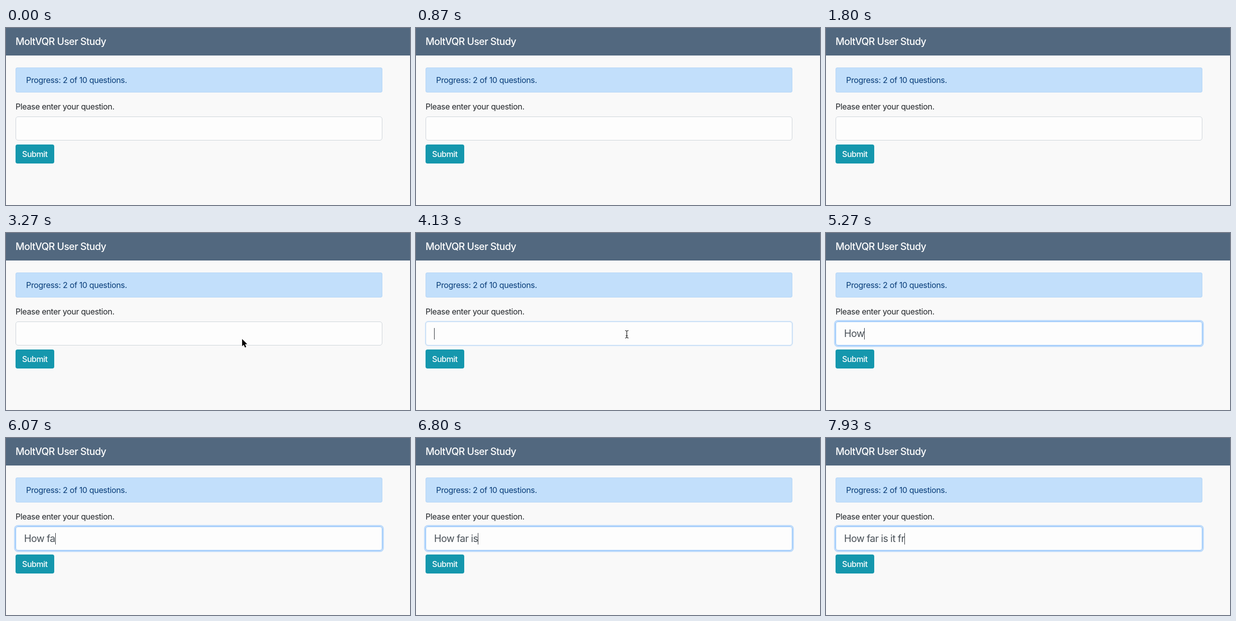
Animation, 804 px wide and 354 px high, one loop 8 s. Source, as an HTML page with a canvas:

```html
<!DOCTYPE html>
<html lang="en">
<head>
<meta charset="utf-8">
<title>User study form</title>
<style>
  html, body { margin: 0; width: 100%; height: 100%; overflow: hidden; background: #f9f9f9; }
  canvas { display: block; }
</style>
</head>
<body>
<canvas id="stage" width="804" height="354"></canvas>
<script>
const ctx = document.getElementById('stage').getContext('2d');
const LOOP = 8000;
const FOCUS = 4060;
const QUESTION = 'How far is it fr';

// Pointer path: time, x, y
const PATH = [[2800, 522, 288], [3030, 496, 246], [3270, 470, 212], [3560, 432, 203], [3800, 419, 202]];
// Typing rhythm: time, characters entered
const TYPING = [[4590, 0], [4790, 1], [5200, 3], [6740, 10], [7890, 16]];

const clamp = v => Math.max(0, Math.min(1, v));
const smooth = v => v * v * (3 - 2 * v);

// Linear interpolation of one column through timed keys
function track(keys, t, col) {
  let i = 1;
  while (i < keys.length - 1 && t > keys[i][0]) i++;
  const a = keys[i - 1], b = keys[i];
  return a[col] + (b[col] - a[col]) * clamp((t - a[0]) / (b[0] - a[0]));
}

function box(x, y, w, h, r, fill, stroke) {
  ctx.beginPath();
  ctx.roundRect(x, y, w, h, r);
  ctx.fillStyle = fill;
  ctx.fill();
  if (!stroke) return;
  ctx.beginPath();
  ctx.roundRect(x + 0.5, y + 0.5, w - 1, h - 1, r - 0.5);
  ctx.strokeStyle = stroke;
  ctx.lineWidth = 1;
  ctx.stroke();
}

function setFont(size, spacing, weight = 400) {
  ctx.font = `${weight} ${size}px Inter, "Open Sans", sans-serif`;
  ctx.letterSpacing = `${size * spacing}px`;
}

function text(str, x, y, color) {
  ctx.fillStyle = color;
  ctx.fillText(str, x, y);
}

function arrow(x, y) {
  ctx.save();
  ctx.translate(x, y);
  ctx.beginPath();
  ctx.moveTo(0, 0);
  for (const [px, py] of [[0, 14.5], [3.3, 11.5], [5.7, 17], [8.2, 16], [5.8, 10.6], [10.2, 10.4]]) {
    ctx.lineTo(px, py);
  }
  ctx.closePath();
  ctx.lineJoin = 'round';
  ctx.lineWidth = 2;
  ctx.strokeStyle = '#fff';
  ctx.stroke();
  ctx.fillStyle = '#000';
  ctx.fill();
  ctx.restore();
}

function beam(x, y) {
  ctx.save();
  ctx.translate(Math.round(x) + 0.5, Math.round(y) + 0.5);
  ctx.beginPath();
  for (const s of [-1, 1]) {
    ctx.moveTo(-3.5, s * 7.5);
    ctx.quadraticCurveTo(0, s * 7.5, 0, s * 5);
    ctx.quadraticCurveTo(0, s * 7.5, 3.5, s * 7.5);
  }
  ctx.moveTo(0, -6);
  ctx.lineTo(0, 6);
  ctx.moveTo(-2, 3);
  ctx.lineTo(2, 3);
  ctx.lineWidth = 1.2;
  ctx.strokeStyle = '#1c1c1c';
  ctx.stroke();
  ctx.restore();
}

function drawPage() {
  ctx.fillStyle = '#f9f9f9';
  ctx.fillRect(0, 0, 804, 354);
  ctx.fillStyle = '#52687f';
  ctx.fillRect(0, 0, 804, 55);
  setFont(19.5, -0.03, 500);
  text('MoltVQR User Study', 19, 34, '#fff');

  box(19, 79, 730, 50, 4, '#c2dffb', '#b5d5f7');
  setFont(16, -0.021);
  text('Progress: 2 of 10 questions.', 40, 110, '#073c78');
  setFont(16, -0.023);
  text('Please enter your question.', 19, 163, '#212529');
  box(19, 233, 77, 38, 4, '#1597ad');
  setFont(16, -0.028, 500);
  text('Submit', 32, 258, '#fff');
}

function drawField(t) {
  const focus = smooth(clamp((t - FOCUS) / 150));
  if (focus > 0) {
    const spread = 3 * focus;
    ctx.globalAlpha = focus;
    box(19 - spread, 177 - spread, 730 + 2 * spread, 48 + 2 * spread, 5 + spread, '#bcdafb');
    ctx.globalAlpha = 1;
  }
  box(19, 177, 730, 48, 5, '#fdfdfd', '#ced4da');
  if (focus > 0) {
    ctx.globalAlpha = focus;
    box(19, 177, 730, 48, 5, '#fdfdfd', '#84bdfa');
    ctx.globalAlpha = 1;
  }
  if (t < FOCUS) return;

  const typed = QUESTION.slice(0, Math.floor(track(TYPING, t, 1) + 1e-6));
  setFont(19.5, -0.03);
  text(typed, 36, 208, '#495057');
  if (typed || t < FOCUS + 500) {
    ctx.fillStyle = '#30343a';
    ctx.fillRect(Math.round(36 + ctx.measureText(typed).width), 190, 1, 23);
  }
}

function drawPointer(t) {
  if (t < PATH[0][0] || t >= TYPING[1][0]) return;
  const x = track(PATH, t, 1), y = track(PATH, t, 2);
  if (t < 3340) arrow(x, y);
  else beam(x, y);
}

function frame() {
  const t = performance.now() % LOOP;
  drawPage();
  drawField(t);
  drawPointer(t);
  requestAnimationFrame(frame);
}
frame();
</script>
</body>
</html>
```
